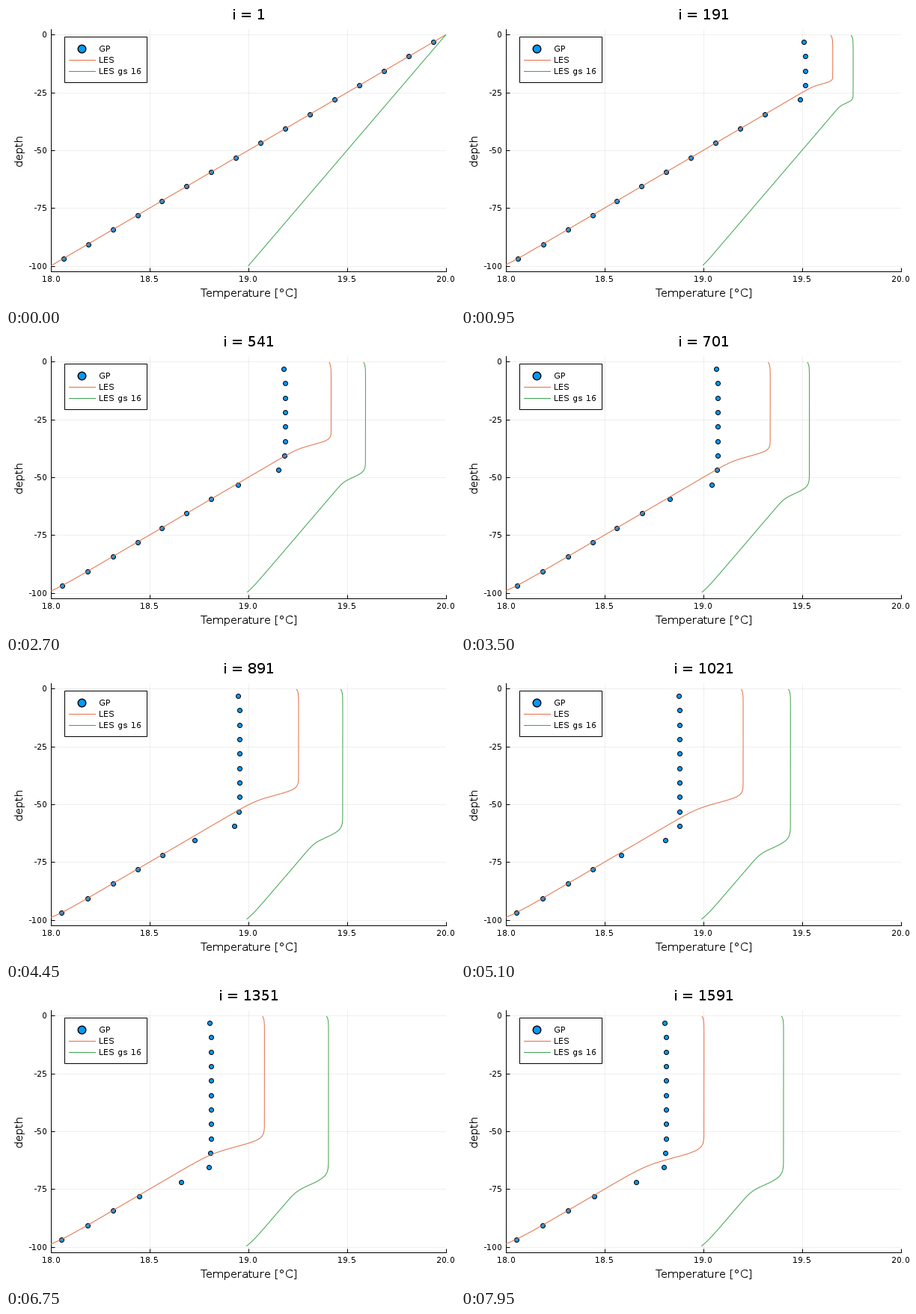
These frames come from a looping animation (600x400 px, 8000 ms). A matplotlib script:

```python
import numpy as np
import matplotlib.pyplot as plt
from matplotlib.animation import FuncAnimation
from matplotlib.patches import Rectangle

W, H, DPI = 600, 400, 100
FRAMES, INTERVAL, STEP = 160, 50, 10
LAST_STEP = 1152          # the GP and coarse runs end here
PX = 72 / DPI             # one pixel in points
BLUE, ORANGE, GREEN = "#009AFA", "#E26F46", "#3DA44E"
LEFT, RIGHT, TOP, BOTTOM = 60.1, 587.7, 31, 355
ZERO, PER_M = 38.5, 3.09  # pixel row of depth 0, pixels per metre

# whole-pixel glyph advances
plt.rcParams.update({"font.family": "DejaVu Sans", "text.hinting": "default",
                     "text.hinting_factor": 1})


def profile(d, n, slope, cool, k, sharp=0, center=1.21, dip=0,
            skin=(0.012, 1.2), base=0.001):
    """Temperature at depth d after n steps of surface cooling."""
    if n == 0:
        return 20 - slope * d
    drop = cool * np.sqrt(n)
    s = d * slope / drop
    x = s - center
    arg = k * x + sharp * np.maximum(x, 0) ** 2
    mixed = 1 / (1 + np.exp(np.clip(arg, -60, 60)))
    u = s + (1 - s) * mixed + dip * np.exp(-((s - 1) / 0.05) ** 2)
    reach = 2.85 * (n / 1590) ** 0.25
    floor = base * np.sqrt(n) * np.exp(-(100 - d) / reach)
    return 20 - drop * u - skin[0] * np.exp(-d / skin[1]) - floor


fig = plt.figure(figsize=(W / DPI, H / DPI), dpi=DPI, facecolor="white")
ax = fig.add_axes([LEFT / W, 1 - BOTTOM / H,
                   (RIGHT - LEFT) / W, (BOTTOM - TOP) / H])
ax.set_xlim(18, 20)
ax.set_ylim((ZERO - BOTTOM) / PER_M, (ZERO - TOP) / PER_M)
x_ticks = np.arange(18, 20.1, 0.5)
y_ticks = np.arange(-100, 1, 25)
ax.set_xticks(x_ticks, [])
ax.set_yticks(y_ticks, [])
ax.tick_params(direction="in", length=5 * PX, width=PX)
ax.grid(color="black", alpha=0.1, linewidth=0.6 * PX)
ax.set_axisbelow(True)
for side, spine in ax.spines.items():
    spine.set_visible(side in ("left", "bottom"))
    spine.set_linewidth(PX)


def label(x, y, text, size, ha="center", **kw):
    return fig.text(x / W, 1 - y / H, text, fontsize=size, ha=ha,
                    va="baseline", rotation_mode="anchor", zorder=12, **kw)


for t in x_ticks:
    label(LEFT + (t - 18) / 2 * (RIGHT - LEFT), 369, f"{t:.1f}", 8)
for t in y_ticks:
    label(55, ZERO - t * PER_M + 4, f"{t}", 8, ha="right")
title = label(324, 18, "", 14)
label(325, 389, "Temperature [°C]", 11)
label(21.5, 193, "depth", 11, rotation=90)

dots, = ax.plot([], [], "o", color=BLUE, markersize=6 * PX, snap=False,
                markeredgecolor="black", markeredgewidth=PX, zorder=3)
les, = ax.plot([], [], color=ORANGE, linewidth=PX, zorder=4)
coarse, = ax.plot([], [], color=GREEN, linewidth=PX, zorder=4)

# legend, placed in pixels
key = fig.add_axes([0, 0, 1, 1], zorder=10)
key.set(xlim=(0, W), ylim=(H, 0))
key.axis("off")
key.add_patch(Rectangle((78.1, 41.1), 110, 60.5, facecolor="white",
                        edgecolor="black", linewidth=PX))
key.plot(101.4, 56.6, "o", color=BLUE, markersize=10.5 * PX, snap=False,
         markeredgecolor="black", markeredgewidth=1.4 * PX)
for y, color in ((71.6, ORANGE), (86.6, GREEN)):
    key.plot([83.5, 118.7], [y, y], color=color, linewidth=PX)
for y, name in ((61, "GP"), (76, "LES"), (91, "LES gs 16")):
    key.text(124, y, name, fontsize=8)

cells = np.linspace(0, 100, 16, endpoint=False) + 3.125
fine = np.linspace(0.3, 99.7, 500)
full = np.linspace(0, 100, 500)


def draw(frame):
    n = frame * STEP
    m = min(n, LAST_STEP)
    d = fine if n else full
    title.set_text(f"i = {n + 1}")
    dots.set_data(profile(cells, m, 0.02, 0.03504, 25, sharp=40, center=1.192,
                          dip=0.004, skin=(0.056, 1.5)), -cells)
    les.set_data(profile(d, n, 0.02, 0.025, 29), -d)
    coarse.set_data(profile(d, m, 0.01, 0.0175, 33, sharp=120,
                            base=0.0004), -d)
    return title, dots, les, coarse


anim = FuncAnimation(fig, draw, frames=FRAMES, interval=INTERVAL,
                     repeat=True, repeat_delay=0)
plt.show()
```
